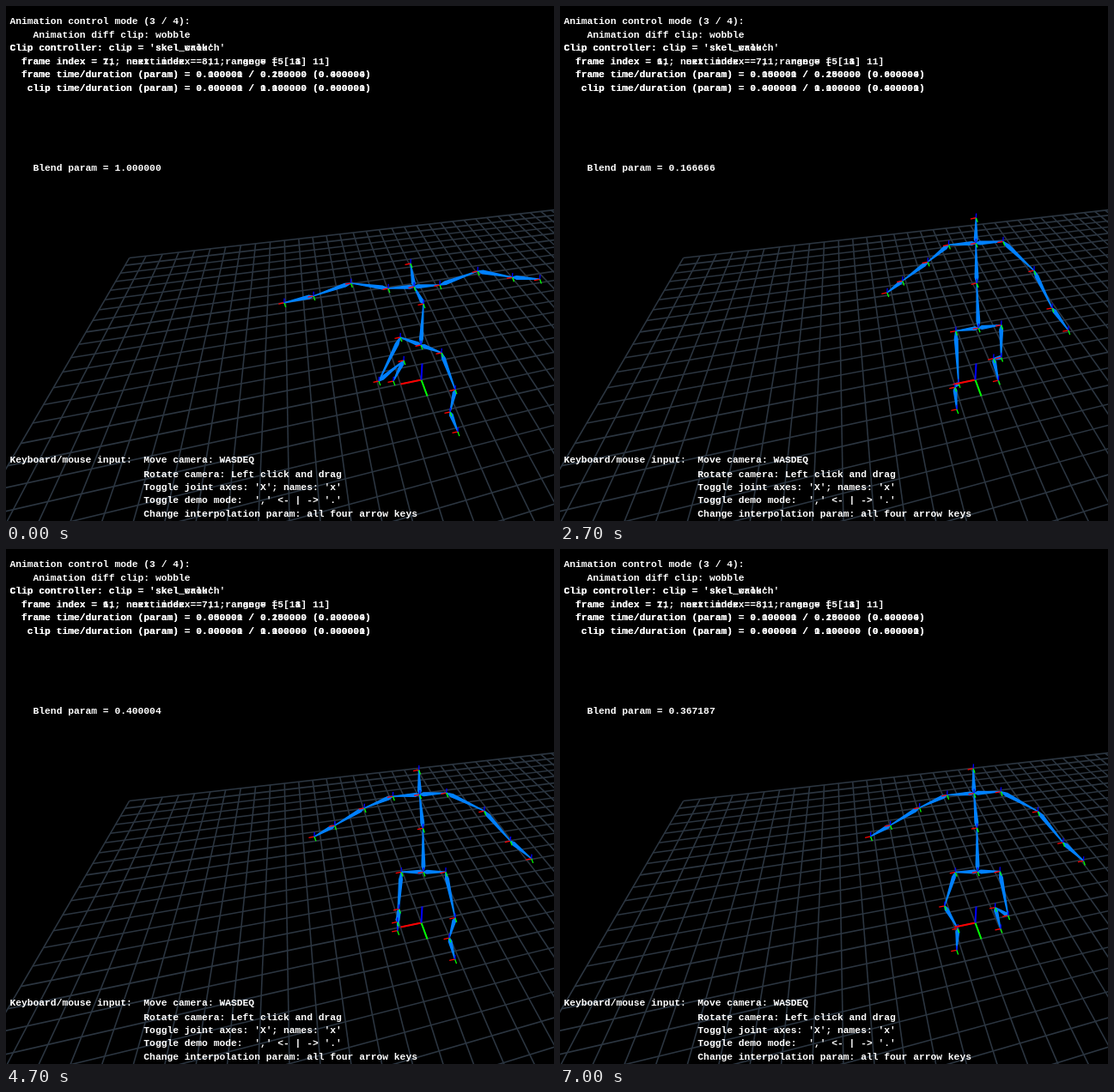
Write an HTML page with a canvas that moves like this. It is 638 px wide and 600 px high and loops after 7.1 s.

```html
<!DOCTYPE html>
<html lang="en">
<head>
<meta charset="utf-8">
<title>Skeletal animation blend</title>
<style>
html, body { margin: 0; background: #000; overflow: hidden; }
canvas { display: block; }
</style>
</head>
<body>
<canvas id="stage" width="638" height="600"></canvas>
<script>
const ctx = document.getElementById('stage').getContext('2d');
const LOOP = 7100, STEP = 100;
const { PI, cos, sin, max, min, floor, round } = Math;
const mix = (a, b, k) => a + (b - a) * k;
const clamp = v => max(0, min(1, v));

// 0 = walk, 1 = crouch: ramps of one unit per second, then a slower fall
function blendAt(t) {
  if (t < 4) return clamp(2.866666 - t);
  if (t < 5.6) return clamp(t - 4.299996);
  return t < 6.1 ? clamp(6.933334 - t) : mix(.833334, .367187, (t - 6.1) / .9);
}

// One walk cycle per second, with a slight drift early on, in 1/30 s ticks
function phaseAt(t) {
  const clip = .6 + t + .093 * max(0, sin(PI * t / 4.7));
  return round(clip * 30) % 30 / 30;
}

// Arm bones as [length, degrees] when walking, then when crouching
const LEFT_ARM = [[25, 116, 44, 188], [32, 134, 46, 161], [16, 130, 35, 167]];
const RIGHT_ARM = [[50, 56, 47, -20], [50, 75, 41, 10], [32, 64, 32, 4]];
// Crouched knee, ankle and toe relative to the hip
const LEFT_CROUCH = [[-25, 51], [4, 27], [-8, 51]];
const RIGHT_CROUCH = [[16, 43], [10, 69], [19, 92]];

function walkLeg(phase) {
  const u = (phase + 1) % 1 > .63 ? phase - 1 : phase;
  const lift = fall => max(0, cos(PI * u / (u < 0 ? .36 : fall)));
  const knee = lift(.3), ankle = lift(1);
  const ax = 2 - 18 * ankle, ay = 88 - 67 * ankle;
  return [[9 - 15 * knee, 63 - 32 * knee], [ax, ay], [ax + 5, ay + 26]];
}

function skeleton(b, phase) {
  const joints = [], bones = [];
  const joint = (parent, dx, dy) => {
    const j = [parent[0] + dx, parent[1] + dy];
    joints.push(j);
    bones.push([parent, j]);
    return j;
  };
  const pelvis = [488 - 5 * b, 375 + 20 * b ** 3];
  joints.push(pelvis);
  const spine = joint(pelvis, 6 * b - 3, 5 * b - 53);
  const chest = joint(spine, 1 - 12 * b, 32 * b - 52);
  joint(chest, 1 - 5 * b, 3 * b - 30);

  const arm = (side, rig, k) => rig.reduce((from, [l0, a0, l1, a1]) => {
    const len = mix(l0, l1, k), a = mix(a0, a1, k) * PI / 180;
    return joint(from, len * cos(a), len * sin(a));
  }, joint(chest, side * (32 - 2 * b), -2 * side));
  arm(-1, LEFT_ARM, b ** .6);
  arm(1, RIGHT_ARM, b);

  const leg = (side, crouch, offset) => {
    const hip = joint(pelvis, side * (27 - 3 * b), side * (15 * b - 6));
    const walk = walkLeg((phase + offset) % 1);
    let last = hip;
    crouch.forEach(([x, y], i) => {
      last = joint(last, hip[0] + mix(walk[i][0], x, b) - last[0], hip[1] + mix(walk[i][1], y, b) - last[1]);
    });
  };
  leg(-1, LEFT_CROUCH, .03);
  leg(1, RIGHT_CROUCH, .53);
  return { joints, bones };
}

function line(x0, y0, x1, y1, color, width) {
  ctx.strokeStyle = color;
  ctx.lineWidth = width;
  ctx.beginPath();
  ctx.moveTo(x0, y0);
  ctx.lineTo(x1, y1);
  ctx.stroke();
}

// Ground plane to screen
function project(x, y) {
  const g = -.01264 * x, h = -.0401 * y, w = 1 + g + h;
  return [(2382 * g + 319 * h + 483) / w + .5, (40 * g - 8 * h + 435) / w + .5];
}

function drawGrid() {
  const color = '#2b3540';
  for (let i = -18; i <= 16; i++) {
    line(...project(i, -16), ...project(i, 16), color, 1.6);
    if (i >= -16) line(...project(-18, i), ...project(16, i), color, 1.6);
  }
}

function drawAxes(x, y, s, width) {
  line(x, y, x - 24 * s, y + 5 * s, '#f00', width);
  line(x, y, x + 7 * s, y + 19 * s, '#0f0', width);
  line(x, y, x + s, y - 19 * s, '#00f', width);
}

function drawBone([x0, y0], [x1, y1]) {
  const dx = x1 - x0, dy = y1 - y0, len = Math.hypot(dx, dy) || 1;
  const nx = -dy / len * 1.8, ny = dx / len * 1.8;
  const mx = x0 + dx * .15, my = y0 + dy * .15;
  ctx.fillStyle = ctx.strokeStyle = '#0080ff';
  ctx.lineWidth = 1.4;
  ctx.lineJoin = 'round';
  ctx.beginPath();
  ctx.moveTo(x0, y0);
  ctx.lineTo(mx + nx, my + ny);
  ctx.lineTo(x1, y1);
  ctx.lineTo(mx - nx, my - ny);
  ctx.closePath();
  ctx.fill();
  ctx.stroke();
}

function print(text, y) {
  ctx.fillText(text, 4.4, y);
}

function printClip(name, index, next, range, time, frameLength, length) {
  const row = (t, d) => `${t.toFixed(6)} / ${d.toFixed(6)} (${(t / d).toFixed(6)})`;
  print(`Clip controller: clip = 'skel_${name}'`, 52);
  print(`  frame index = ${index};  next index = ${next};  range = ${range}`, 68);
  print('  frame time/duration (param) = ' + row(time % frameLength, frameLength), 83);
  print('   clip time/duration (param) = ' + row(time, length), 99);
}

function drawText(b, phase) {
  ctx.fillStyle = '#fff';
  ctx.font = 'bold 11.3px "Liberation Mono", monospace';
  print('Animation control mode (3 / 4):', 21);
  print('    Animation diff clip: wobble', 37);
  const key = floor(phase * 4);
  printClip('walk', 5 + key, 5 + (key + 1) % 4, '[5  8]', phase + 1e-6, .25, 1);
  printClip('crouch', 11, 11, '[11  11]', (phase + 1e-9) % .1, .1, .1);
  print('    Blend param = ' + b.toFixed(6), 192);
  print('Keyboard/mouse input:  Move camera: WASDEQ', 532);
  ['Rotate camera: Left click and drag',
    "Toggle joint axes: 'X'; names: 'x'",
    "Toggle demo mode:  ',' <- | -> '.'",
    'Change interpolation param: all four arrow keys'
  ].forEach((s, i) => print(' '.repeat(23) + s, 549 + 15.2 * i));
}

function draw(now) {
  const t = floor(now % LOOP / STEP) * STEP / 1000;
  const b = blendAt(t), phase = phaseAt(t);
  ctx.fillStyle = '#000';
  ctx.fillRect(0, 0, 638, 600);
  drawGrid();
  const { joints, bones } = skeleton(b, phase);
  bones.forEach(([from, to]) => drawBone(from, to));
  joints.forEach(([x, y]) => drawAxes(x, y, .27, 1.3));
  drawAxes(483.5, 435.5, 1, 2);
  drawText(b, phase);
}

const start = performance.now();
(function tick() {
  draw(performance.now() - start);
  requestAnimationFrame(tick);
})();
</script>
</body>
</html>
```
